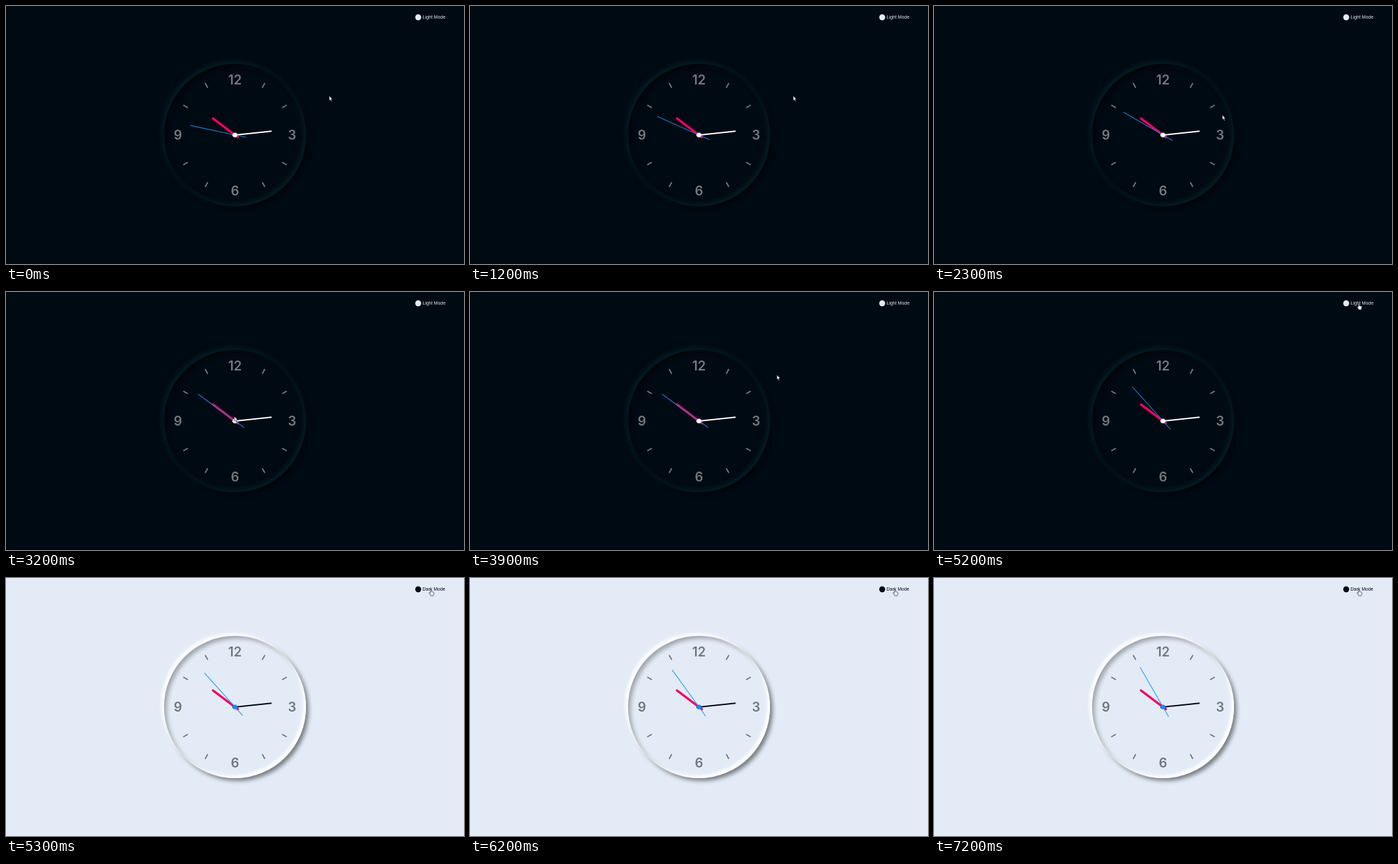
An HTML page that plays this animation: 690 by 388 pixels, repeating every 8 s.

```html
<!DOCTYPE html>
<html lang="en">
<head>
<meta charset="utf-8">
<title>Clock</title>
<style>
  html, body { margin: 0; width: 100%; height: 100%; overflow: hidden; }
  body {
    --bg: #000a12; --ink: #e3ebf6; --minute: #fff; --pin: #fff;
    --second: #167fd0; --mark: #757a7f;
    background: var(--bg);
  }
  body.light {
    --bg: #e3ebf6; --ink: #000a12; --minute: #000a12; --pin: #168df2;
    --second: #1c9df0; --mark: #72767c;
  }
  #dial {
    position: absolute; left: 238px; top: 87px; width: 214px; height: 214px;
    border-radius: 50%;
    box-shadow: -3px -3px 8px rgba(20, 82, 84, .32), 4px 4px 6px rgba(0, 0, 0, .5),
      inset -3px -3px 7px rgba(20, 82, 84, .32), inset 4px 4px 6px rgba(0, 0, 0, .5);
  }
  .light #dial {
    box-shadow: -4px -4px 5px #fff, 4px 4px 6px rgba(0, 0, 0, .48),
      inset -4px -4px 5px #fff, inset 4px 4px 6px rgba(0, 0, 0, .3);
  }
  svg { position: absolute; left: 0; top: 0; }
  #marks line { stroke: var(--mark); stroke-width: 1.8; }
  #marks text {
    fill: var(--mark); font: 600 19.5px Inter, sans-serif; text-anchor: middle;
  }
  #label { fill: var(--ink); font: 7px "Liberation Sans", Arial, sans-serif; }
  #cursor path { fill: #fff; stroke: #000a12; stroke-width: .6; stroke-linejoin: round; }
</style>
</head>
<body>
<div id="dial"></div>
<svg width="690" height="388" viewBox="0 0 690 388">
  <circle cx="621" cy="17" r="4.5" fill="var(--ink)"/>
  <text id="label" x="627.5" y="19.4"></text>
  <g transform="translate(345 194)">
    <g id="marks"></g>
    <line y1="5.5" y2="-41.5" stroke="#f4005f" stroke-width="3.4" stroke-linecap="round" transform="rotate(307)"/>
    <line y1="4" y2="-55.5" stroke="var(--minute)" stroke-width="2" transform="rotate(84)"/>
    <line id="second" y1="17" y2="-69" stroke="var(--second)" stroke-width="1.1"/>
    <circle r="3.5" fill="var(--pin)"/>
  </g>
  <g id="cursor">
    <path id="arrow" d="M0 0V7.3L1.6 5.9L2.8 8.8L4 8.3L2.8 5.5H5Z"/>
    <path id="hand" d="M-.8 .7Q0 -.4 .8 .7V3.6L3.8 4.2Q4.7 4.5 4.6 5.6L4 8V9.7H-.6V8.5L-2.6 5.6Q-2.5 4.5 -1.6 5L-.8 5.8Z"/>
  </g>
</svg>
<script>
const LOOP = 8000, THEME_SWITCH = 5300, OVER_BUTTON = 4500;
const $ = id => document.getElementById(id);

// Pointer stops: time, x, y
const stops = [
  [0, 487, 135], [1300, 487, 135], [1500, 491, 125], [1600, 491, 125],
  [1700, 492, 124], [1800, 492, 124], [2700, 393, 192], [3200, 344, 187],
  [3400, 346, 190], [3500, 346, 190], [4400, 625, 33], [4500, 634, 18],
  [4700, 645, 13], [5000, 640, 17], [LOOP, 640, 17]
];

function pointerAt(time) {
  const t = Math.floor(time / 100) * 100;
  const i = stops.findIndex(stop => stop[0] > t);
  const [t0, x0, y0] = stops[i - 1], [t1, x1, y1] = stops[i];
  let k = (t - t0) / (t1 - t0);
  if (t1 - t0 > 600) k = k * k * (3 - 2 * k);
  return [x0 + (x1 - x0) * k, y0 + (y1 - y0) * k];
}

function addMark(tag, attrs, text = "") {
  const node = document.createElementNS("http://www.w3.org/2000/svg", tag);
  for (const name in attrs) node.setAttribute(name, attrs[name]);
  node.textContent = text;
  $("marks").append(node);
}

for (let hour = 1; hour <= 12; hour++) {
  const angle = hour * Math.PI / 6;
  if (hour % 3) {
    addMark("line", { y1: -82, y2: -90, transform: `rotate(${hour * 30})` });
  } else {
    addMark("text", { x: 86 * Math.sin(angle), y: 7.2 - 83.5 * Math.cos(angle) }, hour);
  }
}

function draw(time) {
  const light = time >= THEME_SWITCH;
  const seconds = 47 + Math.floor((time + 800) / 1000);
  const over = time >= OVER_BUTTON;
  document.body.classList.toggle("light", light);
  $("label").textContent = light ? "Dark Mode" : "Light Mode";
  $("second").setAttribute("transform", `rotate(${seconds * 6})`);
  $("cursor").setAttribute("transform", `translate(${pointerAt(time)})`);
  $("arrow").style.display = over ? "none" : "";
  $("hand").style.display = over ? "" : "none";
}

const start = performance.now();
function tick() {
  draw((performance.now() - start) % LOOP);
  requestAnimationFrame(tick);
}
tick();
</script>
</body>
</html>
```
